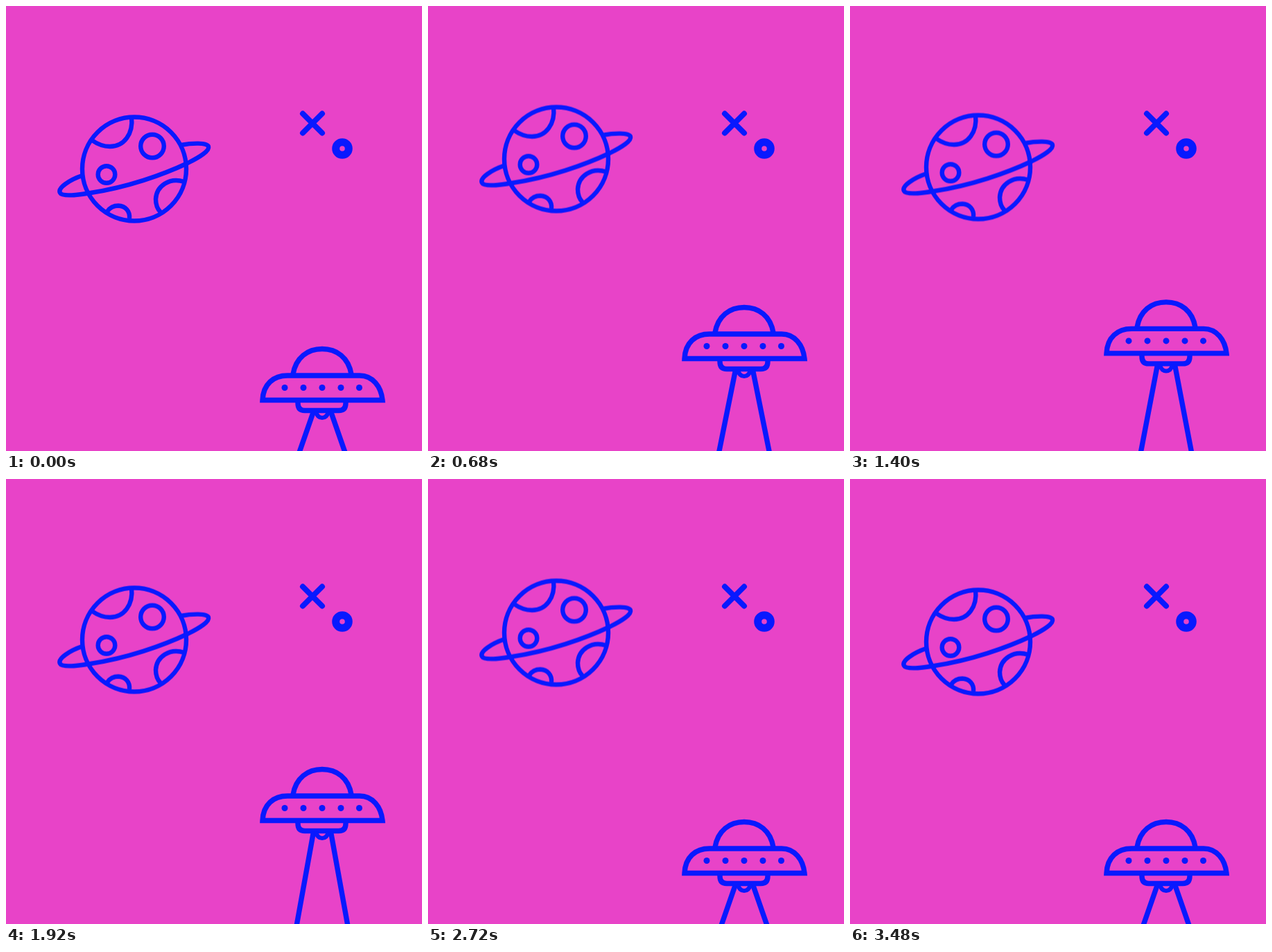
An HTML page without scripts that plays this animation: 600 px wide and 643 px high, repeating every 3.52 s.

```html
<!DOCTYPE html>
<html lang="en">
<head>
<meta charset="utf-8">
<title>Planet and saucer</title>
<style>
  @property --lift {
    syntax: "<number>";
    inherits: true;
    initial-value: 0;
  }
  html, body {
    margin: 0;
    width: 100%;
    height: 100%;
    overflow: hidden;
    background: #e843c8;
  }
  svg {
    display: block;
    width: 600px;
    height: 643px;
    fill: none;
    stroke: #0819ff;
  }
  .planet {
    stroke-width: 6.4;
    animation: bob 1760ms linear infinite;
  }
  .saucer {
    stroke-width: 7.4;
    animation: hover 3520ms linear infinite;
  }
  .craft { transform: translateY(calc(var(--lift) * -1px)); }
  /* The beam's foot stays fixed below the stage while its top follows the craft. */
  .beam {
    transform-origin: 0 668px;
    transform: scaleY(calc(1 + var(--lift) / 82));
  }
  .beam path { vector-effect: non-scaling-stroke; }
  .lights { fill: #0819ff; stroke: none; }

  @keyframes bob {
    0%, 100% { transform: translateY(0); }
    9.1% { transform: translateY(-3.2px); }
    27.3% { transform: translateY(-10.6px); }
    38.6% { transform: translateY(-14.4px); animation-timing-function: ease-out; }
    45.5% { transform: translateY(-15.3px); animation-timing-function: ease-in; }
    54.5% { transform: translateY(-13.5px); }
    79.5% { transform: translateY(-2.7px); }
    90.9% { transform: translateY(-.8px); }
  }
  @keyframes hover {
    0% { --lift: 0; animation-timing-function: cubic-bezier(.45, 0, .6, 1); }
    19.3% { --lift: 60; }
    39.8% { --lift: 67.6; }
    54.5% { --lift: 76; animation-timing-function: cubic-bezier(.65, 0, .35, 1); }
    77.3%, 100% { --lift: 0; }
  }
</style>
</head>
<body>
<svg viewBox="0 0 600 643">
  <g class="planet">
    <circle cx="185" cy="235.5" r="75"/>
    <path d="M110 245C92 251 74 263 78 270C81 276 105 273 122 270C175 262 226 244 262 227C280 218 294 209 292 203C290 197 268 198 252 201"/>
    <circle cx="211" cy="202.5" r="16.8"/>
    <circle cx="145" cy="243.5" r="12.3"/>
    <path d="M181 160C184 185 170 203 150 203C139 203 131 199 124 194"/>
    <path d="M257 254C236 247 217 260 216 279C216 286 218 293 223 298"/>
    <path d="M146 297C150 291 156 288.5 162 288.5C172 289 179 296 178 307"/>
  </g>

  <path d="M428 155.5l28 28m0-28l-28 28" stroke-width="8" stroke-linecap="round"/>
  <circle cx="485" cy="206" r="9.3" stroke-width="11"/>

  <g class="saucer">
    <g class="beam">
      <path d="M443.5 586L415 668M468.5 586L497 668"/>
    </g>
    <g class="craft">
      <path d="M414 532C418 508 435 495.5 456 495.5S494 508 498 532"/>
      <path d="M370 569.5C371 546 386 534 406 534H510C529 534 541 550 543 569.5Z"/>
      <path d="M421 571V574Q421 584.5 431 584.5H480Q490 584.5 490 574V571"/>
      <path d="M447 586Q449 595 456 595Q463 595 465 586" stroke-width="6"/>
      <g class="lights">
        <circle cx="402" cy="551.5" r="4.5"/>
        <circle cx="429" cy="551.5" r="4.5"/>
        <circle cx="456" cy="551.5" r="4.5"/>
        <circle cx="483" cy="551.5" r="4.5"/>
        <circle cx="509.5" cy="551.5" r="4.5"/>
      </g>
    </g>
  </g>
</svg>
</body>
</html>
```
